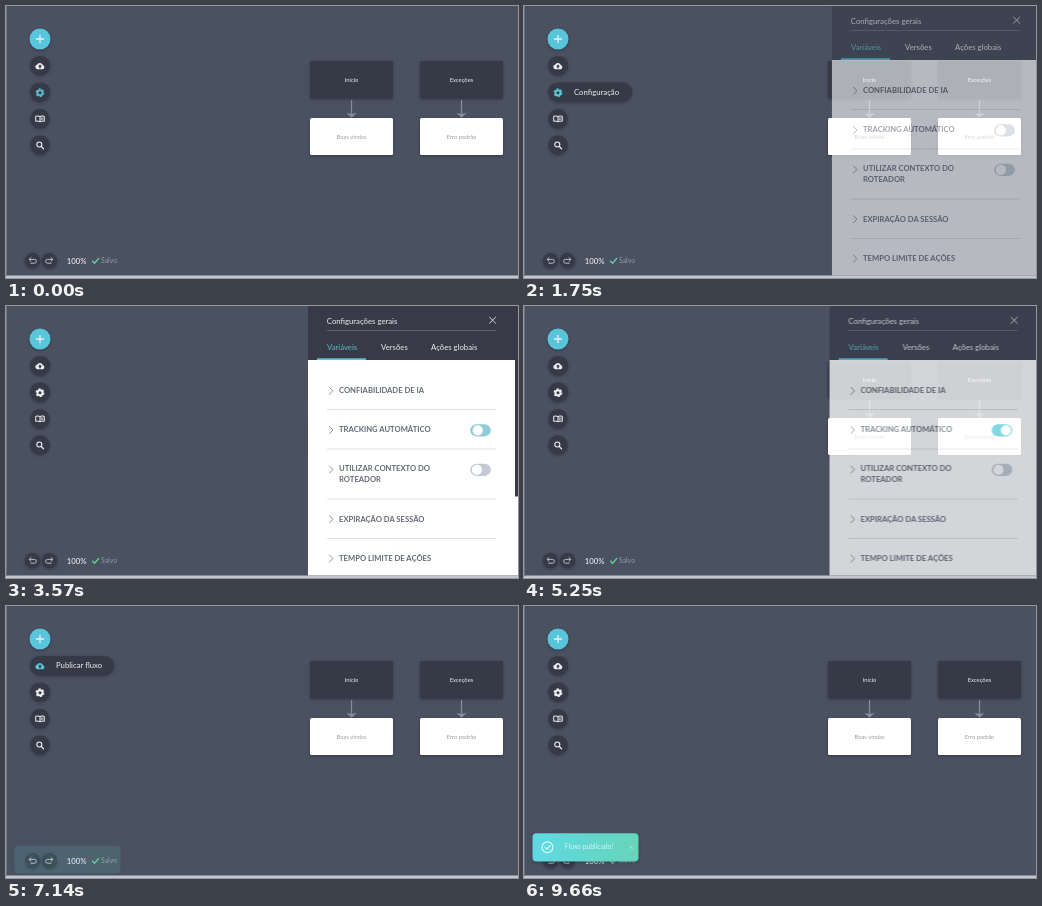
Write an HTML page that moves like this. It is 512 px wide and 272 px high and loops after 9800 ms.

```html
<!DOCTYPE html>
<html lang="pt-BR">
<head>
<meta charset="utf-8">
<title>Editor de fluxo</title>
<style>
  html, body { margin: 0; width: 100%; height: 100%; overflow: hidden; background: #4a5161; }
  svg { display: block; width: 100vw; height: 100vh; }
  text { font-family: Lato, "Open Sans", sans-serif; font-size: 7.75px; fill: #eceef1; }
  .line { fill: none; stroke: currentColor; stroke-linecap: round; stroke-linejoin: round; }
  .dark { fill: #363a46; }
  .shade { filter: drop-shadow(0 1px 1.5px rgba(20, 24, 34, .4)); }
  .card text { font-size: 5.8px; text-anchor: middle; }
  .card .soft { fill: #989ca5; }
  .icon { color: #eceef1; }
  .rows text { font-weight: 700; font-size: 7.65px; fill: #636976; }
  .rows { color: #8d929c; }
  .toast text { font-size: 6.75px; fill: #d3f6f4; }

  .gear, .cloud, .pill, .tip, .panel, .knob, .track, .toast {
    animation: 9.8s ease-in-out infinite both;
  }
  .gear { animation-name: gear; }
  .cloud { animation-name: cloud; }
  .pill.a { animation-name: pillA; }
  .pill.b { animation-name: pillB; }
  .tip.a { animation-name: tipA; }
  .tip.b { animation-name: tipB; }
  .panel { animation-name: panel; }
  .knob { animation-name: knob; }
  .track { animation-name: track; animation-timing-function: linear; }
  .toast { animation-name: toast; animation-timing-function: ease-out; }

  @keyframes gear {
    0% { color: #5ab6c6; }
    3.6%, 20% { color: #58c8dc; }
    23%, 100% { color: #eceef1; }
  }
  @keyframes cloud {
    0%, 65.3% { color: #eceef1; }
    67.5%, 84% { color: #58c8dc; }
    88%, 100% { color: #eceef1; }
  }
  @keyframes pillA {
    0%, 8.2% { width: 20px; }
    13%, 20% { width: 84px; }
    23.6%, 100% { width: 20px; }
  }
  @keyframes tipA {
    0%, 9.8% { opacity: 0; }
    13%, 20% { opacity: 1; }
    21.8%, 100% { opacity: 0; }
  }
  @keyframes pillB {
    0%, 65.3% { width: 20px; }
    70.4%, 84% { width: 84px; }
    89%, 100% { width: 20px; }
  }
  @keyframes tipB {
    0%, 67.2% { opacity: 0; }
    70.4%, 84% { opacity: 1; }
    86.5%, 100% { opacity: 0; }
  }
  @keyframes panel {
    0%, 14.78% { opacity: 0; transform: translateX(15px); }
    20.29%, 51.73% { opacity: 1; transform: none; }
    57.24%, 100% { opacity: 0; transform: translateX(15px); }
  }
  @keyframes knob {
    0%, 35.4% { transform: none; }
    40%, 100% { transform: translateX(7.5px); }
  }
  @keyframes track {
    0%, 35% { fill: #c2cbd5; }
    38%, 100% { fill: #5ccbdc; }
  }
  @keyframes toast {
    0%, 72.4% { opacity: 0; transform: translateY(14px); }
    78%, 100% { opacity: 1; transform: none; }
  }
</style>
</head>
<body>
<svg viewBox="0 0 512 272" preserveAspectRatio="none">
  <defs>
    <linearGradient id="mint">
      <stop offset="0" stop-color="#5fd9e3"/>
      <stop offset="1" stop-color="#66d5b9"/>
    </linearGradient>
    <g id="arrow">
      <path d="M0 94V109" stroke="#858b98" stroke-width="1.3"/>
      <path d="M-5.3 107Q0 108.6 5.3 107L0 111.8Z" fill="#858b98"/>
    </g>
    <path id="chev" class="line" d="M0 -3.5L3.4 0L0 3.5" stroke-width="1"/>
    <path id="turn" class="line" d="M-1.8 -2.9L-3.7 -1.1L-1.8 .7M-3.5 -1.1H1.7A1.9 1.9 0 0 1 1.7 2.7H-2" stroke-width=".9"/>
    <path id="cross" class="line" d="M-3 -3L3 3M3 -3L-3 3"/>
  </defs>

  <rect width="512" height="272" fill="#4a5161"/>

  <g class="card">
    <g class="shade">
      <rect class="dark" x="304" y="55" width="83" height="37.5" rx="1.5"/>
      <rect class="dark" x="414" y="55" width="83" height="37.5" rx="1.5"/>
      <rect x="304" y="112" width="83" height="37" rx="1.5" fill="#fff"/>
      <rect x="414" y="112" width="83" height="37" rx="1.5" fill="#fff"/>
    </g>
    <use href="#arrow" x="345.5"/>
    <use href="#arrow" x="455.5"/>
    <text x="345.5" y="76">Início</text>
    <text x="455.5" y="76">Exceções</text>
    <text class="soft" x="345.5" y="132.6">Boas vindas</text>
    <text class="soft" x="455.5" y="132.6">Erro padrão</text>
  </g>

  <g class="shade">
    <circle cx="34" cy="33" r="10.5" fill="#58c6da"/>
    <rect class="dark pill b" x="24.2" y="50" width="20" height="19.4" rx="9.7"/>
    <rect class="dark pill a" x="24.2" y="76.5" width="20" height="19.4" rx="9.7"/>
    <circle class="dark" cx="34" cy="112.8" r="9.7"/>
    <circle class="dark" cx="34" cy="139" r="9.7"/>
  </g>
  <path class="line icon" d="M30.4 33H37.6M34 29.4V36.6" stroke-width="1.3"/>
  <g transform="translate(34 60.2)">
    <g class="cloud">
      <path d="M-2.6 3A2.3 2.3 0 0 1 -3 -1.5A3.3 3.3 0 0 1 3 -1A2.1 2.1 0 0 1 2.8 3Z" fill="currentColor"/>
    </g>
    <path class="dark" d="M0 -1.7L2 .4H.8V2H-.8V.4H-2Z"/>
  </g>
  <g transform="translate(34 86.7)">
    <g class="gear">
      <circle class="line" r="2.5" stroke-width="2"/>
      <circle r="3.7" fill="none" stroke="currentColor" stroke-width="1.4" stroke-dasharray="2.1 1.775"/>
    </g>
  </g>
  <g class="icon" transform="translate(34 112.8)">
    <path class="line" d="M0 -2.3Q-2 -3.3 -4.3 -2.5V2.5Q-2 1.9 0 2.9Q2 1.9 4.3 2.5V-2.5Q2 -3.3 0 -2.3V2.9" stroke-width="1"/>
    <path class="line" d="M1.4 -1V1M2.8 -1.2V.8" stroke-width=".7"/>
  </g>
  <g class="icon" transform="translate(34 139.2)">
    <circle class="line" cx="-.7" cy="-.7" r="2.5" stroke-width="1.1"/>
    <path class="line" d="M1.2 1.2L3.5 3.5" stroke-width="1.3"/>
  </g>
  <text class="tip b" x="50" y="62.2">Publicar fluxo</text>
  <text class="tip a" x="50" y="88.8">Configuração</text>

  <g class="shade">
    <circle class="dark" cx="26.5" cy="254.7" r="7.6"/>
    <circle class="dark" cx="43.5" cy="254.7" r="7.6"/>
  </g>
  <g color="#c5c9d1">
    <use href="#turn" x="26.8" y="254.5"/>
    <use href="#turn" transform="translate(43.2 254.5) scale(-1 1)"/>
  </g>
  <text x="60.8" y="257.5" font-weight="500">100%</text>
  <path class="line" color="#62cf91" d="M86.6 255.2L88.6 257.3L92.6 252.5" stroke-width="1.4"/>
  <text x="95" y="257" style="font-size:6.9px;fill:#9298a4">Salvo</text>

  <g class="panel">
    <rect x="302" width="210" height="269.5" fill="#fff"/>
    <rect x="302" width="210" height="54" fill="#383b47"/>
    <rect x="509" y="54" width="3" height="136.5" fill="#383b47"/>
    <text x="320.8" y="17.6">Configurações gerais</text>
    <use href="#cross" x="486.6" y="14.2" color="#d5d8dd"/>
    <path d="M321 24.5H490" stroke="#5d626e"/>
    <text x="321" y="44.1" style="fill:#58bccd">Variáveis</text>
    <text x="375" y="44.1">Versões</text>
    <text x="425" y="44.1">Ações globais</text>
    <rect x="311" y="52.3" width="49" height="1.7" fill="#58c6da"/>
    <g class="rows">
      <path d="M321 103.5H490M321 143H490M321 193H490M321 232.5H490" stroke="#dcdfe3"/>
      <use href="#chev" x="323.5" y="84.8"/>
      <use href="#chev" x="323.5" y="124"/>
      <use href="#chev" x="323.5" y="163.5"/>
      <use href="#chev" x="323.5" y="213.2"/>
      <use href="#chev" x="323.5" y="252.6"/>
      <text x="333" y="86.7">CONFIABILIDADE DE IA</text>
      <text x="333" y="125.9">TRACKING AUTOMÁTICO</text>
      <text x="333" y="165.3">UTILIZAR CONTEXTO DO</text>
      <text x="333" y="176">ROTEADOR</text>
      <text x="333" y="215.6">EXPIRAÇÃO DA SESSÃO</text>
      <text x="333" y="254.9">TEMPO LIMITE DE AÇÕES</text>
    </g>
    <rect class="track" x="464.2" y="118.2" width="20.6" height="12.2" rx="6.1"/>
    <circle class="knob" cx="470.9" cy="124.3" r="5.1" fill="#fff"/>
    <rect x="464.2" y="157.7" width="20.6" height="12.2" rx="6.1" fill="#c2cbd5"/>
    <circle cx="470.9" cy="163.8" r="5.1" fill="#fff"/>
  </g>

  <rect y="269.5" width="512" height="2.5" fill="#c3c6d0"/>
  <rect width="1" height="270" fill="#6b7280"/>

  <g class="toast">
    <rect class="shade" x="8.5" y="227.3" width="106" height="28.2" rx="4" fill="url(#mint)"/>
    <g color="#e4fbfa">
      <circle class="line" cx="23.4" cy="241.3" r="5.4" stroke-width="1.1"/>
      <path class="line" d="M21 241.4L22.8 243.2L26 239.6" stroke-width="1.1"/>
      <use href="#cross" transform="translate(107.4 241.4) scale(.45)"/>
    </g>
    <text x="40.8" y="243.4">Fluxo publicado!</text>
  </g>
</svg>
</body>
</html>
```
